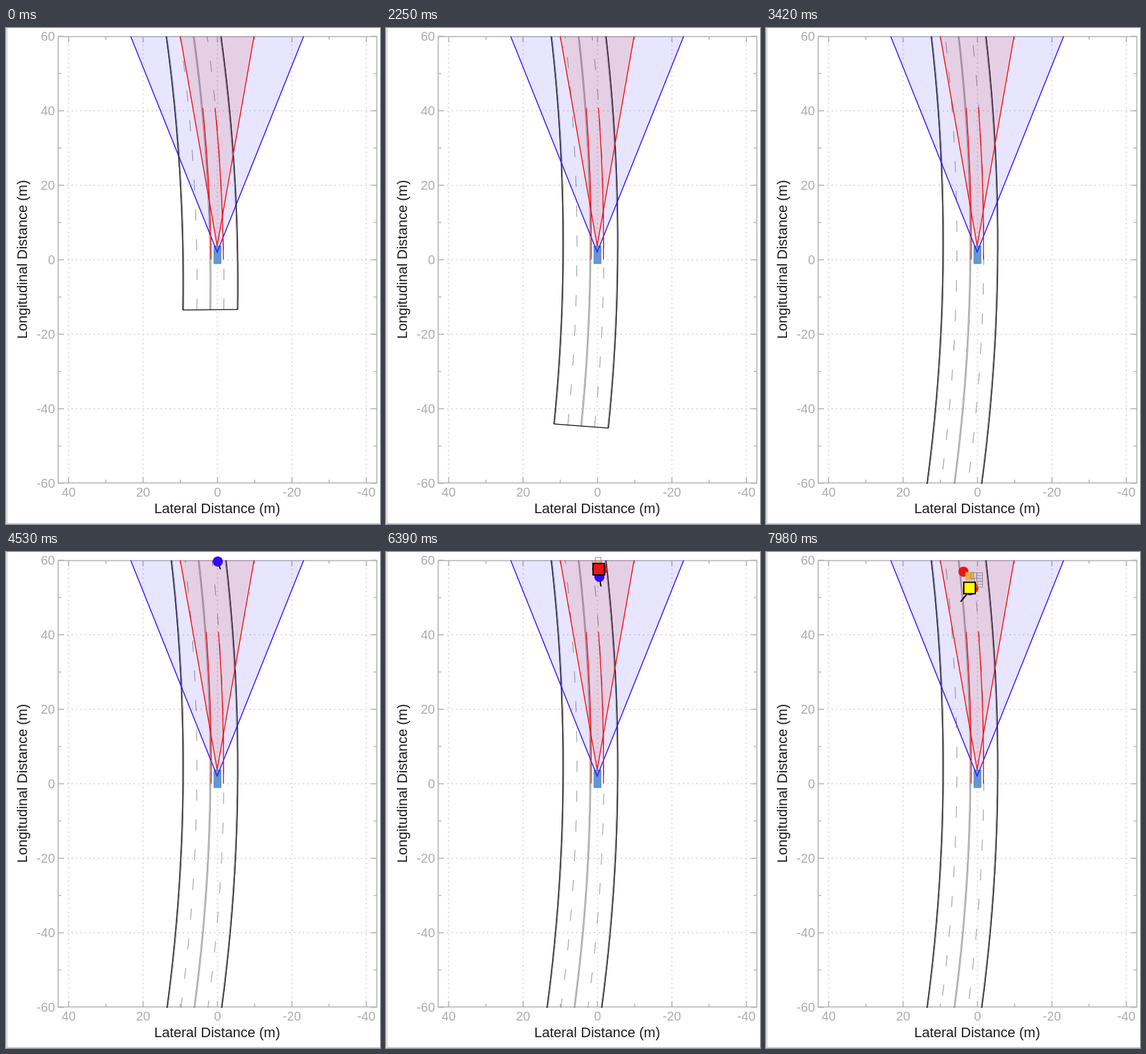
These frames come from a looping animation (588 px wide and 779 px high, 8 s). An HTML page:

```html
<!DOCTYPE html>
<html lang="en">
<head>
<meta charset="utf-8">
<title>Lane and sensor view</title>
<style>
  html, body { margin: 0; width: 100%; height: 100%; overflow: hidden; background: #fff; }
  svg { display: block; width: 588px; height: 779px; }
  text { font-family: "Liberation Sans", Arial, sans-serif; }
  .tick { font-size: 20px; fill: #acacac; }
  .name { font-size: 22px; fill: #1c1c1c; text-anchor: middle; }
</style>
</head>
<body>
<svg id="stage" viewBox="0 0 588 779" xmlns="http://www.w3.org/2000/svg">
  <defs><clipPath id="plot"><rect x="82" y="13" width="501" height="703"/></clipPath></defs>
  <path d="M1.5 0V778.5H588" fill="none" stroke="#b4b4b4"/>
  <g id="axes"></g>
  <g id="road" fill="none" clip-path="url(#plot)"></g>
  <g id="fans" clip-path="url(#plot)"></g>
  <rect x="327" y="342.5" width="11" height="27.5" fill="#6496d2" stroke="#4c84c8"/>
  <g id="sensors" fill="none" stroke-width="1.5"></g>
  <g id="targets"></g>
</svg>
<script>
const NS = "http://www.w3.org/2000/svg";
const LOOP = 8000, M = 5.85, CX = 332.5, CY = 364;
const RED = "#ec1414", GRAY = "#8c8c8c";
const $ = id => document.getElementById(id);

function set(el, attrs) {
  for (const k in attrs) el.setAttribute(k, attrs[k]);
}
function add(parent, tag, attrs, text) {
  const el = document.createElementNS(NS, tag);
  set(el, attrs);
  if (text) el.textContent = text;
  return parent.appendChild(el);
}

function drawAxes() {
  const axes = $("axes");
  const grid = add(axes, "g", { stroke: "#d9d9d9", "stroke-width": 2, "stroke-dasharray": "2 5" });
  const frame = add(axes, "g", { stroke: "#b2b2b2", "stroke-width": 1.6, fill: "none" });
  const labels = add(axes, "g", { class: "tick" });
  add(frame, "rect", { x: 82, y: 13.5, width: 501, height: 701 });
  for (let m = -60; m <= 60; m += 10) {
    const major = m % 20 === 0, len = major ? 9 : 5;
    const x = CX - m * M, y = CY - m * M;
    add(frame, "path", { d: `M82 ${y}h${len}M583 ${y}h${-len}` });
    if (major) {
      if (Math.abs(m) < 60) add(grid, "path", { d: `M82 ${y}H583` });
      add(labels, "text", { x: 77, y: y + 7, "text-anchor": "end" }, String(m));
    }
    if (Math.abs(m) > 40) continue;
    add(frame, "path", { d: `M${x} 13.5v${len}M${x} 714.5v${-len}` });
    if (major) {
      add(grid, "path", { d: `M${x} 714V13` });
      add(labels, "text", { x, y: 736, "text-anchor": "middle" }, String(m));
    }
  }
  add(axes, "text", { class: "name", x: 332, y: 762 }, "Lateral Distance (m)");
  add(axes, "text", { class: "name", transform: "translate(32.5 363.5) rotate(-90)" }, "Longitudinal Distance (m)");
}

function drawFan(half, apex, fill, stroke) {
  const d = `M${332 - half} 13L332 ${apex}L${332 + half} 13`;
  add($("fans"), "path", { d, fill, "fill-opacity": .1 });
  add($("sensors"), "path", { d, stroke });
}

drawAxes();
drawFan(136, 352, "rgb(25,5,255)", "#3212f8");
drawFan(58, 342, "rgb(205,10,0)", "#f01414");

// Five markings: double lines at the edges and centre, dashes between
const LEFT = 278.1, RIGHT = 364.5, WIDTH = 21.2;
const lines = [];
const addLine = (x, attrs) => lines.push({ x, el: add($("road"), "path", attrs) });
for (let i = 0; i < 5; i++) {
  const x = LEFT + .8 + i * WIDTH;
  if (i % 2) {
    addLine(x, { stroke: GRAY, "stroke-dasharray": `${3 * M} ${5 * M}` });
    continue;
  }
  addLine(x - .8, { stroke: GRAY });
  addLine(x + .8, { stroke: GRAY });
}
for (const x of [LEFT, RIGHT]) addLine(x, { stroke: "#000", "stroke-width": 1.25 });
const cap = add($("road"), "path", { stroke: "#000", "stroke-width": 1.25 });
const lanes = [322.5, 341.8].map(x => ({ x, el: add($("sensors"), "path", { stroke: "#f01414" }) }));

const targets = $("targets");
const circle = fill => add(targets, "circle", { r: 8, fill });
const square = (size, attrs) => add(targets, "rect", { width: size, height: size, ...attrs });
const radarB = circle(RED);
const ghost = square(13, { fill: "#f0b03c" });
const radarA = circle(RED);
const trail = Array.from({ length: 5 }, () => square(9, { fill: "none", stroke: GRAY }));
const heading = add(targets, "path", { stroke: "#000", "stroke-width": 2 });
const camera = circle("#320af5");
const track = square(18, { stroke: "#000", "stroke-width": 2 });

// The picture advances ten steps per cycle, with a longer hold first
const CYCLE = 1140, HOLD = 150, STEP = 110;
function stepAt(ms) {
  const t = ms - 30, cycle = Math.floor(t / CYCLE), p = t - cycle * CYCLE;
  const k = p < HOLD ? 0 : 1 + Math.floor((p - HOLD) / STEP);
  return Math.max(0, cycle * 10 + k);
}

function show(el, visible) {
  el.style.display = visible ? "" : "none";
}
function place(el, x, y) {
  if (el.tagName === "circle") return set(el, { cx: x, cy: y });
  const half = el.getAttribute("width") / 2;
  set(el, { x: x - half, y: y - half });
}

const CURVE = .00103;
function updateRoad(n) {
  const end = 13.5 + 2.02 * n - 8.45 * (1 - Math.exp(-n / 7.5));
  const tilt = .0223 * Math.exp(-n / 3) - .0093;
  const start = Math.min(end, 64);
  const lean = 2 * CURVE * start - tilt - .025;

  const point = (x, y) =>
    `${(x - (CURVE * y * y + tilt * y) * M).toFixed(2)} ${(CY - y * M).toFixed(2)}`;
  const curve = (x, from, to) =>
    "M" + Array.from({ length: 25 }, (_, i) => point(x, from + (to - from) * i / 24)).join("L");
  const rear = x => -start - (x - LEFT) * lean / M;

  for (const { x, el } of lines) set(el, { d: curve(x, rear(x), 61), "stroke-dashoffset": (end - start) * M });
  for (const { x, el } of lanes) set(el, { d: curve(x, .1, 40.8) });
  set(cap, { d: `M${point(LEFT, rear(LEFT))}L${point(RIGHT, rear(RIGHT))}` });
}

function updateTargets(n) {
  const u = (n - 39) / 30;           // approach of the vehicle ahead
  const v = Math.max(0, (n - 55) / 14); // drift after it is confirmed
  const x = 333 + 23.7 * u - 35.7 * u * u, y = 15 + 45 * u;
  const tx = x - 1, ty = y - 21.7 + 18.2 * u;

  show(camera, n >= 38);
  show(heading, n >= 38);
  for (const el of [track, radarA]) show(el, n >= 48);
  for (const el of [radarB, ghost]) show(el, n >= 53);

  place(camera, x, y);
  place(track, tx, ty);
  place(radarA, tx + 6, ty);
  place(radarB, tx - 2.5 - 7 * v, ty - 25.5 * v);
  place(ghost, tx - 1 + v, ty - 6.5 - 12 * v);
  set(track, { fill: n < 58 ? RED : "#ffff00" });
  set(heading, { d: `M${x} ${y}l${4 - 19 * u ** 4} ${12 + 6 * u}` });

  const count = n < 53 ? 0 : 1 + Math.floor(4 * v);
  const hx = tx - 1 + 17 * v, hy = ty - 14 - 5.5 * v;
  trail.forEach((el, i) => {
    show(el, i < count);
    place(el, hx - (i > 3 ? 9.5 : 0), hy + (i % 4) * 4.6);
  });
}

function update(ms) {
  const n = stepAt(ms);
  updateRoad(n);
  updateTargets(n);
}

const begin = performance.now();
function frame() {
  update((performance.now() - begin) % LOOP);
  requestAnimationFrame(frame);
}
update(0);
requestAnimationFrame(frame);
</script>
</body>
</html>
```
